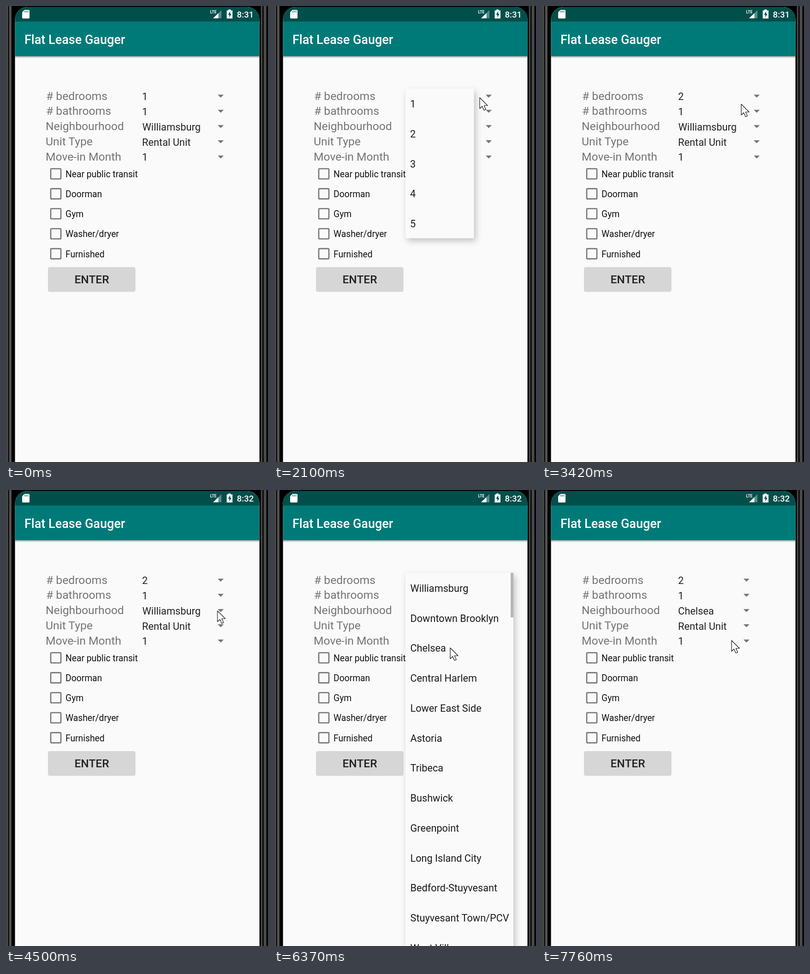
Animation of 568x985 px, one loop 7990 ms. Source, as an HTML page:

```html
<!DOCTYPE html>
<html lang="en">
<head>
<meta charset="utf-8">
<title>Rent form</title>
<style>
html, body { margin: 0; width: 100%; height: 100%; overflow: hidden; background: #000; }
svg { display: block; width: 100%; height: 100%; font-family: Roboto, "Open Sans", sans-serif; }
.label { font-size: 24.7px; fill: #757575; }
.value { font-size: 21.8px; fill: #212121; }
.check { font-size: 19.3px; fill: #111; }
.item { font-size: 21.7px; fill: #1a1a1a; }
.title { font-size: 27px; font-weight: 500; fill: #fff; }
.button { font-size: 24.5px; font-weight: 500; fill: #212121; text-anchor: middle; }
.clock { font-size: 18.6px; font-weight: 500; fill: #fff; }
.lte { font-size: 8.6px; font-weight: 700; fill: #fff; }
.box { fill: none; stroke: #757575; stroke-width: 2.6; }
.panel { fill: currentColor; filter: drop-shadow(4px 6px 7px rgba(0, 0, 0, .22)); }
.popup { color: #fafafa; }

.anim { animation: 7990ms step-end infinite; }
.later, .popup, .ripple, #cursor { opacity: 0; }
.bed1 { animation-name: bed1; }
.bed2 { animation-name: bed2; }
.hood1 { animation-name: hood1; }
.hood2 { animation-name: hood2; }
.time1 { animation-name: time1; }
.time2 { animation-name: time2; }
#arrows { animation-name: arrows; }
#beds { animation-name: beds; }
#hoods { animation-name: hoods; }
.ripple { animation-name: ripple; filter: blur(1px); }
#cursor { animation-name: cursor; }

@keyframes bed1 { 38.92% { opacity: 0; } }
@keyframes bed2 { 38.92% { opacity: 1; } }
@keyframes hood1 { 82.6% { opacity: 0; } }
@keyframes hood2 { 82.6% { opacity: 1; } }
@keyframes time1 { 46.8% { opacity: 0; } }
@keyframes time2 { 46.8% { opacity: 1; } }
@keyframes arrows { 82.6% { transform: translateX(-22.3px); } }
@keyframes ripple { 36.04% { opacity: 1; } }
@keyframes beds {
  19.39% { opacity: 1; }
  38.92% { opacity: .28; color: #e4e4e4; }
  42.8% { opacity: 0; }
}
@keyframes hoods {
  68.96% { opacity: 1; }
  82.6% { opacity: .28; color: #e4e4e4; }
  86.6% { opacity: 0; }
}
@keyframes cursor {
  12.64% { opacity: 1; transform: translate(454px, 188px); }
  16.64% { opacity: 1; transform: translate(446px, 198px); }
  29.16% { opacity: 1; transform: translate(373px, 273px); }
  33.16% { opacity: 1; transform: translate(371.5px, 275px); }
  42.8% { opacity: 1; transform: translate(432px, 212px); }
  46.8% { opacity: 1; transform: translate(458px, 236px); }
  53.56% { opacity: 1; transform: translate(458.5px, 261px); }
  71.83% { opacity: 1; transform: translate(422.5px, 300px); }
  76.84% { opacity: 1; transform: translate(382px, 341px); }
  94.24% { opacity: 1; transform: translate(411px, 325px); }
}
</style>
</head>
<body>
<svg viewBox="0 0 568 985" preserveAspectRatio="none">
  <defs>
    <linearGradient id="shade" x2="0" y2="1">
      <stop offset="0" stop-color="#000" stop-opacity=".34"/>
      <stop offset="1" stop-color="#000" stop-opacity="0"/>
    </linearGradient>
    <clipPath id="screen"><rect x="19.5" y="2" width="530" height="1040" rx="27"/></clipPath>
  </defs>

  <!-- phone frame -->
  <rect width="568" height="985"/>
  <rect width="5" height="985" fill="#444"/>
  <rect x="7" width="4" height="985" fill="#5a5a5a"/>
  <rect x="11" width="2" height="985" fill="#222"/>
  <rect x="552.5" width="3.5" height="985" fill="#444"/>
  <rect x="558.5" width="6" height="985" fill="#4a4a4a"/>

  <g clip-path="url(#screen)">
    <rect width="568" height="985" fill="#fafafa"/>
    <rect width="568" height="34" fill="#004f4b"/>
    <rect y="33.5" width="568" height="75" fill="#007a78"/>
    <rect y="108.5" width="568" height="4.500" fill="url(#shade)"/>
  </g>

  <!-- status icons -->
  <path d="M40 8.5h9q2 0 2 2v14.500q0 2-2 2h-12q-2 0-2-2v-11.500z" fill="#fff"/>
  <path d="M41 10.500v3.500M44.300 10.500v3.500M47.600 10.500v3.500" stroke="#004f4b" stroke-width="1.300"/>
  <path d="M467 9v17.500h-18z" fill="#fff" opacity=".35"/>
  <path d="M460.500 15.500v11h-11.500z" fill="#fff"/>
  <text class="lte" x="442.500" y="15.500">LTE</text>
  <path d="M482 9.500v-2h5v2h4v17.500h-12.500v-17.500z" fill="#fff"/>
  <path d="M486 11.500l-4.700 7.300h2.900v5.500l4.600-7.400h-2.800z" fill="#004f4b"/>
  <text class="clock anim time1" x="500.500" y="24.500">8:31</text>
  <text class="clock anim time2 later" x="500.500" y="24.500">8:32</text>

  <text class="title" x="40" y="82">Flat Lease Gauger</text>

  <g id="labels"></g>
  <g id="values">
    <text class="value anim bed1" x="295" y="203">1</text>
    <text class="value anim bed2 later" x="295" y="203">2</text>
    <text class="value" x="295" y="236">1</text>
    <text class="value anim hood1" x="295.500" y="268.700">Williamsburg</text>
    <text class="value anim hood2 later" x="295" y="268.700">Chelsea</text>
    <text class="value" x="295" y="301.500">Rental Unit</text>
    <text class="value" x="295" y="334.300">1</text>
  </g>
  <g id="arrows" class="anim" fill="#757575"></g>
  <g id="checks"></g>

  <rect x="91" y="565.500" width="189.500" height="52" rx="4" fill="#000" opacity=".14"/>
  <rect x="91" y="564" width="189.500" height="51.500" rx="4" fill="#d6d6d6"/>
  <text class="button" x="186" y="598.500">ENTER</text>

  <g id="beds" class="popup anim">
    <rect class="panel" x="285" y="178" width="148.500" height="323.700" rx="2"/>
    <rect class="ripple anim" x="314" y="243" width="109" height="64" rx="9" fill="#ededed"/>
  </g>
  <g id="hoods" class="popup anim">
    <rect class="panel" x="285" y="179" width="234" height="860" rx="2"/>
    <rect x="513" y="179" width="6" height="96" fill="#b6b6b6"/>
  </g>

  <path id="cursor" class="anim" d="M0 0V23.500L5.300 18.500 9.300 27.300 13.200 25.500 9.300 17H17z"
    fill="#fff" stroke="#111" stroke-width="1.200" stroke-linejoin="round"/>
</svg>

<script>
const add = (id, parts) =>
  document.getElementById(id).insertAdjacentHTML("beforeend", parts.join(""));
const text = (cls, x, y, s) => `<text class="${cls}" x="${x}" y="${y}">${s}</text>`;

const labels = ["# bedrooms", "# bathrooms", "Neighbourhood", "Unit Type", "Move-in Month"];
const options = ["Near public transit", "Doorman", "Gym", "Washer/dryer", "Furnished"];
const hoods = ["Williamsburg", "Downtown Brooklyn", "Chelsea", "Central Harlem",
  "Lower East Side", "Astoria", "Tribeca", "Bushwick", "Greenpoint", "Long Island City",
  "Bedford-Stuyvesant", "Stuyvesant Town/PCV", "West Village"];
const rowStep = 32.85, checkStep = 43.15, itemStep = 64.75;

add("labels", labels.map((s, i) => text("label", i < 2 ? 87 : 86, 202.5 + i * rowStep, s)));
add("arrows", labels.map((s, i) => `<path d="M459 ${191.5 + i * rowStep}h13l-6.5 6.500z"/>`));
add("checks", options.map((s, i) =>
  `<rect class="box" x="97" y="${351.5 + i * checkStep}" width="22" height="22" rx="1.500"/>` +
  text("check", 129, 370 + i * checkStep, s)));
add("beds", [1, 2, 3, 4, 5].map((s, i) => text("item", 295, 219 + i * itemStep, s)));
add("hoods", hoods.map((s, i) => text("item", 295.5, 219.8 + i * itemStep, s)));
</script>
</body>
</html>
```
